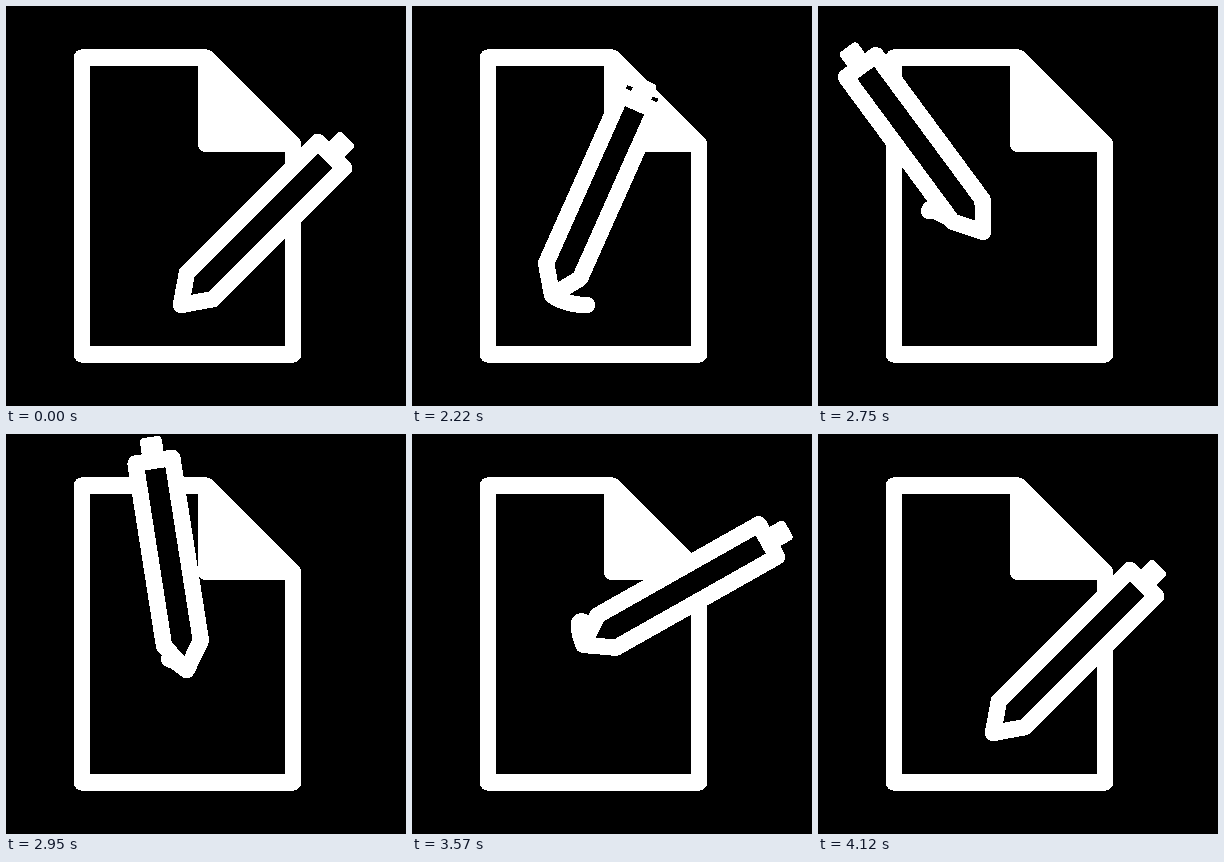
Write an HTML page that moves like this. It is 400x400 px and loops after 4150 ms.

```html
<!DOCTYPE html>
<html>
<head>
<meta charset="utf-8">
<style>
html, body { margin: 0; width: 100%; height: 100%; overflow: hidden; background: #000; }
svg { display: block; width: 400px; height: 400px; shape-rendering: crispEdges; }
path { fill: none; stroke: #fff; stroke-width: 16.4; stroke-linejoin: round; stroke-linecap: round; }
</style>
</head>
<body>
<svg viewBox="0 0 400 400">
  <path d="M76 51.5H200L287 138V348.5H76Z"/>
  <path d="M200 51.5V138H287Z" style="fill:#fff"/>
  <path id="trail"/>
  <g id="pen">
    <path id="gap" style="stroke:#000;stroke-width:4;stroke-linecap:butt"/>
    <path id="barrel" style="fill:#000"/>
    <path id="cap" style="fill:#fff;stroke-width:8"/>
  </g>
</svg>
<script>
const LOOP = 4150, START = 2010, STROKE = 522, LAG = 225;

// Four Bezier strokes, joined end to end, of [tip x, tip y, pen angle]
const rest = [175, 299, 45], left = [111, 202, -28], low = [208, 257, 12], turn = [172, 213, 60.5];
const strokes = [
  [rest, [150, 299, 40], [107, 288, -3], left],
  [left, [201, 246, -57], [140, 206, -25], low],
  [low, [234, 260, 42], [145, 135, 62], turn],
  [turn, [195, 270, 60], [185, 299, 45], rest]
];
const $ = id => document.getElementById(id);
const phase = t => Math.min(Math.max((t - START) / STROKE, 0), strokes.length);

function pose(s) {
  const i = Math.min(Math.floor(s), strokes.length - 1);
  const [a, b, c, d] = strokes[i], u = s - i, v = 1 - u;
  return a.map((_, k) =>
    v * v * v * a[k] + 3 * u * v * v * b[k] + 3 * u * u * v * c[k] + u * u * u * d[k]);
}

function draw(t) {
  const s = phase(t), [x, y, angle] = pose(s);
  // The pen looks shorter while it leans back on the left
  const size = 1 - 0.13 * Math.exp(-(((s - 1) / 0.34) ** 2));
  const at = d => -d * size;
  $('pen').setAttribute('transform', `translate(${x} ${y}) rotate(${angle})`);
  $('gap').setAttribute('d', `M-17 ${at(212) - 10}H17`);
  $('barrel').setAttribute('d',
    `M0 0L-18.6 ${at(27)}V${at(212)}H18.6V${at(27)}Z`);
  $('cap').setAttribute('d', `M-7 ${at(216)}V${at(232)}H7V${at(216)}Z`);

  const points = [];
  for (let lag = LAG; lag >= 0; lag -= 9) points.push(pose(phase(t - lag)).slice(0, 2));
  $('trail').setAttribute('d', 'M' + points.join('L'));
}

const start = performance.now();
function frame() {
  draw((performance.now() - start) % LOOP);
  requestAnimationFrame(frame);
}
frame();
</script>
</body>
</html>
```
